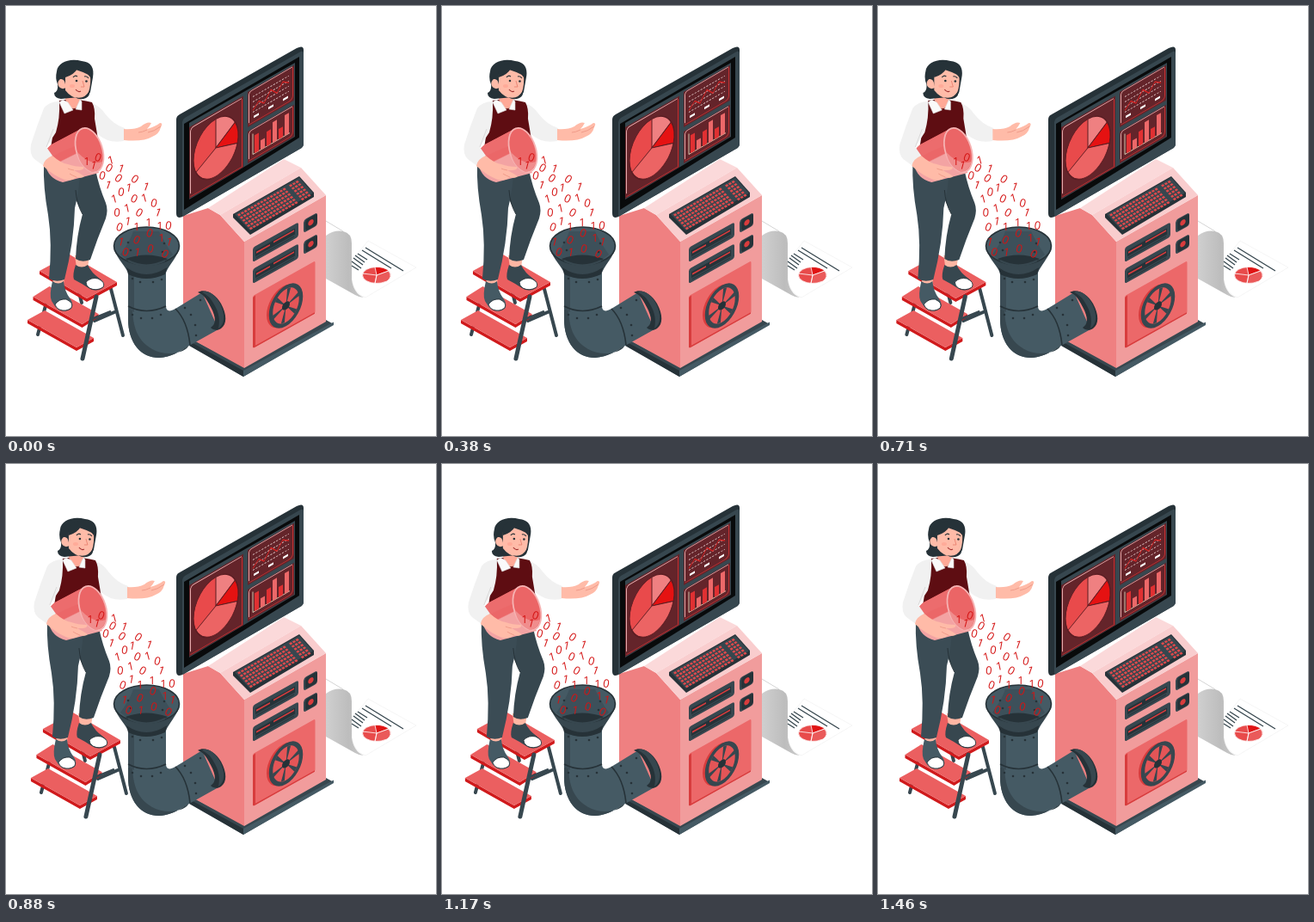
These frames come from a looping animation (500x500 px, 1500 ms). An HTML page:

```html
<!DOCTYPE html>
<html lang="en">
<head>
<meta charset="utf-8">
<title>Data machine</title>
<style>
html, body { margin: 0; width: 100%; height: 100%; overflow: hidden; background: #fff; }
svg { display: block; width: 100vw; height: 100vh; }
text { font: 13px "Open Sans", sans-serif; text-anchor: middle; fill: #d41414; }
</style>
</head>
<body>
<svg viewBox="0 0 500 500" xmlns="http://www.w3.org/2000/svg">
  <defs>
    <linearGradient id="curl"><stop offset="0" stop-color="#cfcfcf"/><stop offset=".6" stop-color="#bdbdbd"/><stop offset="1" stop-color="#cacaca"/></linearGradient>
    <linearGradient id="tin" x1="0" y1="0" x2=".5" y2="1"><stop offset=".6" stop-color="#eb6768"/><stop offset=".62" stop-color="#f3a3a3"/></linearGradient>
  </defs>

  <g id="paper">
    <path d="M402 296L421 273L477 304L418 339Q405 335 402 318Z" fill="#fff" stroke="#f3f3f3" stroke-width=".8"/>
    <path d="M372 250L392 262" stroke="#d5d5d5" fill="none"/>
    <path d="M372 267Q382 260 392 262Q402 264 402 276V318Q404 334 416 339Q411 339 406 336L372 317Z" fill="url(#curl)"/>
    <g stroke="#37474f" stroke-width="1.3">
      <path d="M418 281L462 308M414 284L448 305M409 288L420 295M406 290L417 298M404 293L415 301M402 297L413 305M402 302L410 307"/>
    </g>
    <g stroke="#fff" stroke-width=".8">
      <ellipse cx="431" cy="313" rx="16.5" ry="9.5" fill="#e84b4b"/>
      <path d="M431 313L429 303.5Q440 303 445 308Z" fill="#e01414"/>
      <path d="M431 313L445 308Q450 315 443 320Q436 323 429 322.5Z" fill="#ea5a5a"/>
      <path d="M431 313L414.500 311M431 313L429 322.500" fill="none"/>
    </g>
  </g>

  <g id="machine">
    <path d="M206 382L276 419L372 365L381 370L276 431L206 390Z" fill="#37474f"/>
    <path d="M206 386L276 424V431L206 391Z" fill="#263238"/>
    <path d="M276 424L381 367.500V371L276 431Z" fill="#455a64"/>
    <path d="M206 244L235 235L249 243L277 274V421L206 382Z" fill="#ef8081"/>
    <path d="M277 274L372 220V367L277 421Z" fill="#f19c9c"/>
    <path d="M235 235L323 178L343 188L249 243Z" fill="#fbd9da"/>
    <path d="M249 243L343 188L372 220L277 274Z" fill="#f9cdce"/>
    <path d="M264 242L341 198L358 217V222L284 266L264 246Z" fill="#263238"/>
    <path d="M266 242L341 199.500L357 217.500L283.500 261Z" fill="#37474f"/>
    <g id="keys" fill="#e04a4c"></g>
  </g>

  <g id="front" transform="matrix(1 -.56 0 1 287 281)">
    <g id="drives"></g>
    <rect x="0" y="56" width="72.500" height="61" rx="2" fill="#ec6869"/>
    <path d="M0 58V115Q0 117 2 117H72V115.500H3V57Z" fill="#d83c3d"/>
    <ellipse cx="35" cy="87.500" rx="19" ry="23" fill="#d83c3d"/>
    <g transform="translate(38.500 89)">
      <ellipse rx="17.500" ry="21.500" fill="#e45557" stroke="#37474f" stroke-width="4.500"/>
      <g id="fan"></g>
      <circle r="4.500" fill="#263238"/>
    </g>
  </g>

  <g id="monitor">
    <path d="M198 132Q198 128 202 126L338 49Q346 45 346 51V160Q346 164 342 166L207 244Q198 249 198 241Z" fill="#263238"/>
    <path d="M205 135Q205 132 208 130L341 54Q346 51 346 55V160Q346 164 342 166L206 244.500Q205 245 205 242Z" fill="#37474f"/>
    <path d="M207 137L341 59V153L207 237Z" fill="#080a0b"/>
    <path d="M213 136L336 66V152L213 225Z" fill="#37474f"/>
    <g transform="matrix(1 -.58 0 1 213 140)">
      <rect y="1" width="63" height="83" fill="#64242a"/>
      <path d="M1.500 79V8Q1.500 3 6 3H61" fill="none" stroke="#f1b9b9" stroke-width=".9"/>
      <path d="M1.500 82.500H61.500V4" fill="none" stroke="#c33" stroke-width=".9"/>
      <g transform="translate(31 43)" stroke="#5a1c22" stroke-width="1">
        <ellipse rx="26" ry="33.500" fill="#e94a4b"/>
        <path d="M0 0V-33.500A26 33.500 0 0 1 22.500 -17Z" fill="#ef8081"/>
        <path d="M0 0L22.500 -17A26 33.500 0 0 1 25 9Z" fill="#e51212"/>
        <path d="M0 0L25 9A26 33.500 0 0 1 -23 15Z" fill="#ec6464"/>
      </g>
    </g>
    <g transform="matrix(1 -.58 0 1 281 100)">
      <rect width="54" height="41" fill="#64242a"/>
      <path d="M1.500 37V5Q1.500 1 5 1H52" fill="none" stroke="#f1b9b9" stroke-width=".9"/>
      <path d="M1.500 39H48Q52.500 39 52.500 34V2" fill="none" stroke="#c33" stroke-width=".9"/>
      <path d="M6 9H48M6 15H48M6 21H48M6 27H48" stroke="#e8cfcf" stroke-width=".9" stroke-dasharray="2 1.400"/>
      <path d="M6 25L13 18L19 24L27 13L34 21L41 12L48 17" fill="none" stroke="#d22" stroke-width="1"/>
      <path d="M7 33H13M24 33H30M41 33H47" stroke="#fff" stroke-width="2.500"/>
    </g>
    <g transform="matrix(1 -.58 0 1 281 146)">
      <rect width="54" height="37" fill="#64242a"/>
      <path d="M1.500 33V5Q1.500 1 5 1H52" fill="none" stroke="#f1b9b9" stroke-width=".9"/>
      <path d="M1.500 35H48Q52.500 35 52.500 30V2" fill="none" stroke="#c33" stroke-width=".9"/>
      <path d="M6 6V30H49" fill="none" stroke="#eec" stroke-width=".7"/>
      <g id="bars"></g>
    </g>
  </g>

  <g id="pipe">
    <path d="M142 308V364C142 392 157 409 178 409C193 408 201 402 213 395L247 376L228 333L197 352C190 356 186 355 186 349V308Z" fill="#455a64"/>
    <path d="M142 353V364C142 392 157 409 178 409C192 408 200 403 212 395C211 402 187 409 170 399C151 388 148 371 147 353Z" fill="#37474f"/>
    <path d="M142 308H149V356L142 352Z" fill="#3b4c55"/>
    <path d="M142 349Q163 360 186 349M197 352Q211 366 214 394" fill="none" stroke="#263238" stroke-width="1.600"/>
    <path d="M223 333C231 328 243 334 250 346C257 359 257 370 250 375C246 378 241 377 238 374C244 370 245 363 238 350C233 340 229 335 223 333Z" fill="#263238"/>
    <path d="M230 332C240 330 251 345 253 359C254 368 250 373 247 375C249 366 248 357 242 347Q237 337 228 333Z" fill="#37474f"/>
    <path d="M125 279C126 290 137 300 142 310Q163 322 186 310C190 300 201 290 202 279Z" fill="#37474f"/>
    <path d="M140 304Q163 320 187 304L185 312Q163 322 142 312Z" fill="#263238"/>
    <ellipse cx="163.500" cy="279" rx="38" ry="22" fill="#455a64" stroke="#263238" stroke-width="1.600"/>
    <path d="M133 289Q144 274 148 262H178Q184 275 194 289Q181 301 163 301Q145 301 133 289Z" fill="#3d505a"/>
    <path d="M139 294Q163 285 188 294Q179 301 163 301Q147 301 139 294Z" fill="#263238"/>
    <path d="M142 296Q163 307 185 296" fill="none" stroke="#37474f" stroke-width="2"/>
    <g id="bolts" fill="#263238"></g>
  </g>

  <g id="worker">
    <g id="ladder">
      <path d="M48 341L37 382M122 329L136 383M103 366L126 356M78 306L88 345" fill="none" stroke="#37474f" stroke-width="4" stroke-linecap="round"/>
      <g id="steps"></g>
      <path d="M105 338L89 410" stroke="#37474f" stroke-width="5" stroke-linecap="round"/>
      <path d="M100 364L122 355" stroke="#37474f" stroke-width="2.500"/>
    </g>

    <g id="legs">
      <path d="M80 290L97 290L95 305L82 304Z" fill="#ffb6a3"/>
      <path d="M54 313L68 313L67 325L55 325Z" fill="#ffb6a3"/>
      <path d="M81 301Q88 306 95 301Q99 310 109 317Q116 322 112 328Q104 333 96 328Q87 322 79 318Q77 313 81 301Z" fill="#37474f"/>
      <path d="M93 321Q99 315 107 317Q116 321 113 327Q105 332 97 328Q93 325 93 321Z" fill="#fff" stroke="#263238" stroke-width=".9"/>
      <path d="M54 320Q61 325 67 320Q68 332 75 341Q79 347 76 352Q69 357 61 353Q56 349 53 343Q50 337 54 320Z" fill="#455a64"/>
      <path d="M57 347Q62 340 70 341Q79 345 76 351Q70 356 62 353Q58 351 57 347Z" fill="#fff" stroke="#263238" stroke-width=".9"/>
      <path d="M75 188L104 190Q108 210 116 229Q119 237 116 247Q106 271 98 295Q88 299 81 294Q82 267 89 242L78 218Z" fill="#37474f"/>
      <path d="M44 183Q62 195 86 192Q86 211 80 235Q79 275 68 318Q58 322 50 317Q54 275 49 243Q43 210 44 183Z" fill="#3b4c55"/>
      <path d="M81 214Q82 230 89 242" fill="none" stroke="#263238" stroke-width="1"/>
    </g>

    <g id="torso">
      <path d="M99 113Q108 115 115 125Q125 138 138 142L137 157Q119 160 108 150Q101 143 98 135Z" fill="#f1f1f1"/>
      <path d="M137 143Q149 144 157 140Q164 134 169 136Q167 140 164 143Q174 140 179 136Q183 136 180 141Q178 149 170 152Q160 158 137 156Z" fill="#ffbba8"/>
      <path d="M164 144Q158 147 154 147M180 140Q172 146 165 147" fill="none" stroke="#e88f7d" stroke-width=".7"/>
      <path d="M62 110Q77 106 100 112Q104 119 103 131L107 155L88 168L52 165L56 140Z" fill="#5e0d12"/>
      <path d="M67 100H86L87 114Q78 124 71 115Z" fill="#ffa997"/>
      <path d="M66 109L72 112L78 121L68 125L62 112ZM86 109L81 120L88 121L88 111Z" fill="#fafafa" stroke="#ddd" stroke-width=".6"/>
    </g>

    <g id="head">
      <path d="M59 76C60 65 75 60 88 64C99 65 103 72 101 83L98 100Q95 108 85 106L64 108Q56 107 56 101Q61 99 60 91Q57 84 59 76Z" fill="#263238"/>
      <path d="M69 79Q73 84 81 74Q91 77 98 81Q99 92 96 100Q92 107 85 108Q75 106 69 98Z" fill="#ffbba8"/>
      <path d="M69 91Q68 84 63 85Q59 88 61 93Q64 98 70 95Z" fill="#ffbba8"/>
      <path d="M69 83Q79 80 83 73Q91 73 99 84Q101 74 97 70Q88 63 78 67Q66 70 69 83Z" fill="#263238"/>
      <path d="M80 106Q91 109 97 99Q98 104 93 107Q86 110 80 106Z" fill="#263238"/>
      <path d="M89 87L91 94L87 94" fill="none" stroke="#e98270" stroke-width=".9"/>
      <path d="M78 83Q80 80 83 82M91 82Q94 81 96 84" fill="none" stroke="#263238" stroke-width="1.200"/>
      <circle cx="82" cy="87" r="1.300" fill="#263238"/><circle cx="93.500" cy="87.500" r="1.300" fill="#263238"/>
      <path d="M81 97Q84 101 87 99" fill="none" stroke="#a12f2f" stroke-width="1.100"/>
      <ellipse cx="77" cy="93" rx="3" ry="2" fill="#ffa08f" opacity=".6"/>
    </g>

    <g id="bucket">
      <path d="M89 142L53 161Q43 168 45 183Q49 201 66 205L108 194Z" fill="url(#tin)"/>
      <path d="M89 142L53 161Q43 168 45 183Q50 174 88 160Z" fill="#ec6c6d"/>
      <ellipse cx="97" cy="167.500" rx="15" ry="26.500" transform="rotate(-18 97 167.500)" fill="#eb6566" stroke="#f6b3b3" stroke-width="1.800"/>
      <path d="M83 170Q86 187 100 193Q110 192 112 181Q98 186 83 170Z" fill="#f08d8d"/>
      <path d="M62 111Q50 111 44 119Q36 139 29 161Q27 172 33 178L44 186L54 174L47 164L58 147Q63 130 62 111Z" fill="#f1f1f1"/>
      <path d="M47 164L55 143" fill="none" stroke="#d6d6d6" stroke-width=".9"/>
      <path d="M43 186Q44 178 54 174Q64 183 72 184Q80 187 90 187Q92 190 85 191L79 191Q87 195 91 198Q89 201 82 199Q76 204 68 202Q55 197 43 186Z" fill="#ffbba8"/>
      <path d="M79 191Q74 190 72 189M82 199Q77 197 74 195" fill="none" stroke="#e88f7d" stroke-width=".7"/>
    </g>
    <g id="digits"></g>
  </g>
</svg>
<script>
const $ = id => document.getElementById(id);
const fill = (id, items) => { $(id).innerHTML = items.join(''); };
const range = n => Array.from({ length: n }, (_, i) => i);

// Keyboard: a skewed grid of short keys
fill('keys', range(6).flatMap(r => range(19).map(c => {
  if (c > 14 && c < 16) return '';
  const x = 269 + c * 3.75 + r * 2.75, y = 242.6 - c * 2.13 + r * 3.15;
  return `<path d="M${x} ${y}l2.6 -1.5l1.7 1.9l-2.6 1.5z"/>`;
})));

const drive = y => `<g transform="translate(0 ${y})">
  <rect width="53" height="17" rx="2.500" fill="#37474f"/>
  <rect x="3" y="5" width="46" height="7" fill="#263238"/>
  <path d="M4 8H20M24 7H48" stroke="#d83c3d" stroke-width="1.800"/>
  <path d="M4 14H48" stroke="#263238" stroke-width="1"/>
  <rect x="59" y="1" width="16" height="15" rx="3" fill="#37474f"/>
  <rect x="61" y="2" width="14" height="13" rx="3" fill="#263238"/>
  <circle cx="67.500" cy="8.500" r="3.200" fill="#d83c3d"/></g>`;
fill('drives', [drive(0), drive(25)]);

fill('fan', range(6).map(i =>
  `<path d="M0 0L-2 -19L3 -19Z" fill="#37474f" transform="scale(.82 1) rotate(${i * 60 + 12})"/>`));

fill('bars', [21, 11, 17, 24, 12, 24].map((h, i) =>
  `<rect x="${8 + i * 7}" y="${30 - h}" width="5" height="${h}" fill="${i % 2 ? '#ec6869' : '#e03032'}"/>`));

const bolts = [[142, 275], [145, 284], [184, 276], [182, 286], [156, 321], [171, 321], [181, 318], [147, 359],
  [157, 363], [170, 363], [180, 359], [208, 351], [215, 359], [220, 371], [221, 383], [226, 342], [147, 317]];
fill('bolts', bolts.map(([x, y]) => `<circle cx="${x}" cy="${y}" r="1.300"/>`));

// Ladder steps: top face plus a bright front edge
const step = (x, y, w, h, dx, dy) => `
  <path d="M${x} ${y}l${w} ${h}l${dx} ${-dy}v4l${-dx} ${dy}l${-w} ${-h}z" fill="#d01a1c"/>
  <path d="M${x} ${y}l${w} ${h}l${dx} ${-dy}l${-w} ${-h}z" fill="#eb5f60"/>`;
fill('steps', [step(25, 365, 57, 32, 20, 11), step(31.5, 338, 57, 32, 19, 12), step(39, 308, 55, 32, 35, 19)]);

// x, y, digit, angle
const digits = `94 180 1 0,102 185 1 15,107 176 0 20,122 179 1 -15,120 188 0 30,134 189 1 20,112 197 0 15,
131 200 0 35,150 201 0 35,119 208 1 20,143 211 1 10,163 210 1 20,126 224 1 -15,134 216 0 10,149 224 0 25,
161 223 1 -15,172 229 0 15,129 240 0 5,141 235 1 -12,155 240 0 30,177 240 1 20,132 257 0 20,142 250 1 10,
152 256 1 0,166 251 1 0,179 255 1 0,189 255 0 10,134 274 1 15,152 272 0 25,167 264 0 20,181 269 1 0,
190 274 1 15,139 286 0 20,153 286 1 10,168 282 0 15,185 288 0 30`;
fill('digits', digits.split(',').map(d => {
  const [x, y, c, a] = d.trim().split(' ');
  return `<text transform="translate(${x} ${y}) rotate(${a})" y="4.600">${c}</text>`;
}));

const LOOP = 1500;
const sway = [0, -1, 2, -4, 4, -4, 4, -4, 2, -1, 0];
const bez = (a, b, u) => 3 * (1 - u) * (1 - u) * u * a + 3 * (1 - u) * u * u * b + u * u * u;

function ease(p) {
  let lo = 0, hi = 1;
  for (let i = 0; i < 24; i++) {
    const mid = (lo + hi) / 2;
    if (bez(.25, .25, mid) < p) lo = mid; else hi = mid;
  }
  return bez(.1, 1, lo);
}

function draw(ms) {
  const k = ms % LOOP / LOOP * (sway.length - 1), i = Math.floor(k);
  const x = sway[i] + (sway[i + 1] - sway[i]) * ease(k - i);
  $('worker').setAttribute('transform', `translate(${x.toFixed(3)} 0)`);
}

const start = performance.now();
function tick() {
  draw(performance.now() - start);
  requestAnimationFrame(tick);
}
tick();
</script>
</body>
</html>
```
